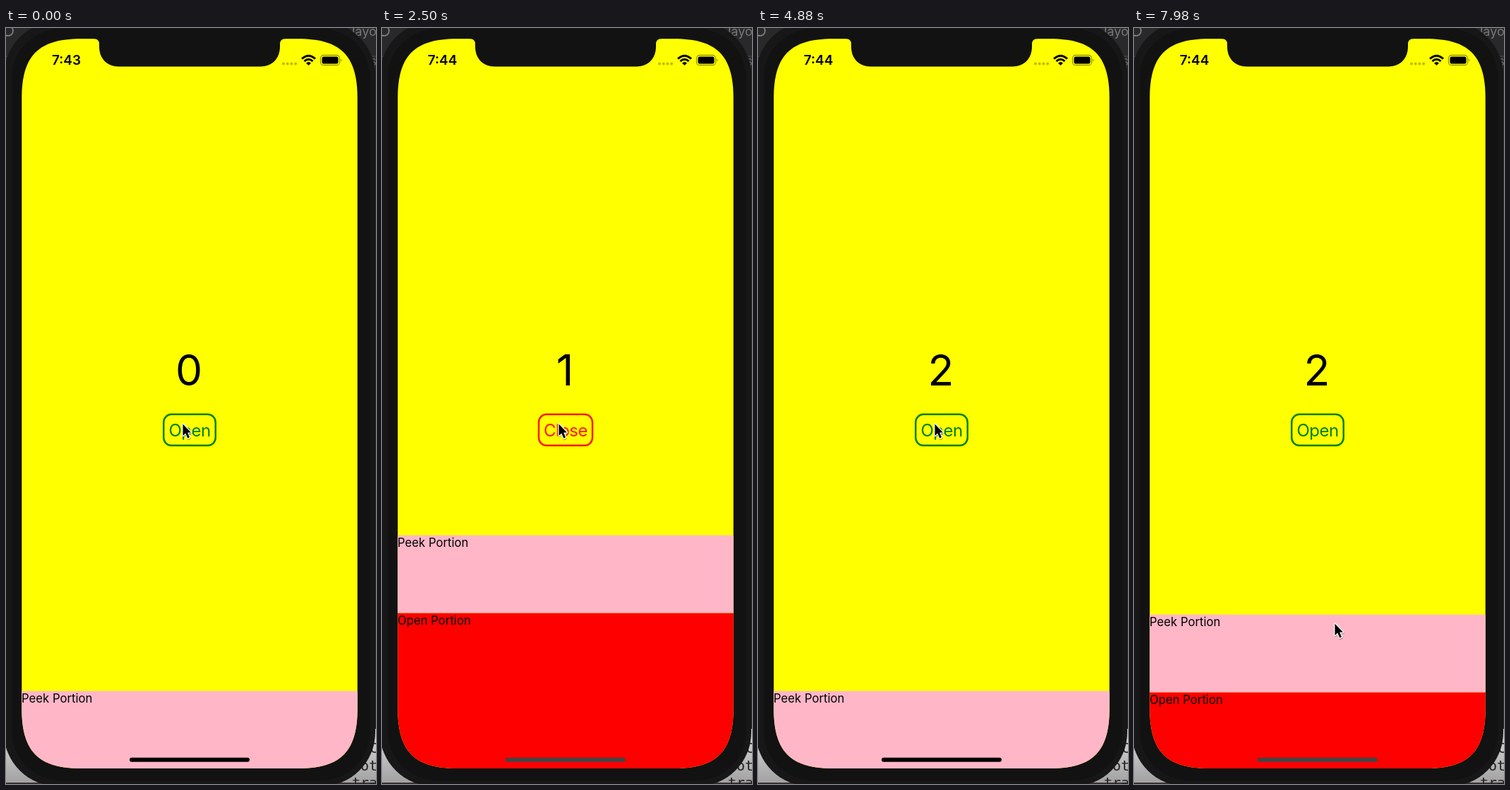
An HTML page that plays this animation: 524x1068 px, repeating every 8 s.

```html
<!DOCTYPE html>
<html lang="en">
<head>
<meta charset="utf-8">
<title>Bottom sheet</title>
<style>
html, body { margin: 0; width: 100%; height: 100%; overflow: hidden; background: #222; }
svg { display: block; width: 524px; height: 1068px; font-family: Inter, Roboto, sans-serif; }
.mid { text-anchor: middle; }
.code { font-family: "DejaVu Sans Mono", "Noto Sans Mono", monospace; font-size: 20px; fill: #222; }
</style>
</head>
<body>
<svg viewBox="0 0 524 1068">
  <defs>
    <clipPath id="screen">
      <path d="M22.300 99C22.300 39 46 15.300 106 15.300H414C474 15.300 497.700 39 497.700 99V962C497.700 1022 474 1046 414 1046H106C46 1046 22.300 1022 22.300 962Z"/>
    </clipPath>
    <linearGradient id="desk" x2="0" y2="1">
      <stop offset="0" stop-color="#ddd"/>
      <stop offset="1" stop-color="#a0a0a0"/>
    </linearGradient>
  </defs>

  <!-- desktop behind the phone -->
  <rect width="524" height="1068" fill="#29292b"/>
  <path d="M0 40H524" stroke="#3b3b3d" stroke-width="2"/>
  <circle cx="3" cy="4" r="7" fill="none" stroke="#777" stroke-width="2"/>
  <rect y="990" width="524" height="78" fill="url(#desk)"/>
  <path d="M0 1067H524" stroke="#3a3030" stroke-width="2"/>

  <text x="490" y="11" font-size="18" fill="#777">layout</text>
  <text x="516" y="53" font-size="17" fill="#666">s</text>
  <text x="515" y="1024" class="code">C</text>
  <text x="502" y="1049" class="code">ot</text>
  <text x="490" y="1073" class="code">tra</text>
  <rect x="-3" y="-9" width="526" height="1080" rx="76" fill="#171717"/>
  <rect x="8" y="1" width="508" height="1062" rx="70" fill="#121212"/>

  <g clip-path="url(#screen)">
    <rect width="524" height="1068" fill="#ff0"/>
    <text id="count" x="259" y="505" class="mid" font-size="60.500"></text>
    <g id="button">
      <rect id="frame" y="545.800" height="44" rx="11" fill="none" stroke="currentColor" stroke-width="2.500"/>
      <text id="label" x="260" y="577" class="mid" font-size="24" letter-spacing="-.5" fill="currentColor"></text>
    </g>
    <g id="sheet" font-size="16.700">
      <rect width="524" height="110" fill="#ffb7c8"/>
      <rect y="110" width="524" height="400" fill="#f00"/>
      <text x="22" y="16.200">Peek Portion</text>
      <text x="22" y="126.200">Open Portion</text>
    </g>
    <rect id="home" x="175" y="1030.800" width="170" height="6" rx="3"/>
  </g>
  <path d="M124 14V15Q132 15 132 23V26C132 43 143 54.500 160 54.500H360C377 54.500 388 43 388 26V23Q388 15 396 15V14Z" fill="#121212"/>

  <!-- status bar -->
  <text id="clock" x="85.500" y="52" class="mid" font-size="19" font-weight="600"></text>
  <path d="M393 50.500H411" stroke="#bcbc00" stroke-width="4" stroke-linecap="round" stroke-dasharray="0 5.700"/>
  <g fill="none" stroke="#000" stroke-width="3">
    <path d="M419 43.500Q428.500 35 438 43.500M422.500 47Q428.500 41.500 434.500 47"/>
    <path d="M425 49.500Q428.500 46.500 432 49.500L428.500 53Z" fill="#000" stroke="none"/>
  </g>
  <rect x="445.500" y="38.500" width="27" height="14" rx="4" fill="none" stroke="#999900" stroke-width="1.300"/>
  <rect x="447.500" y="40.500" width="23" height="10" rx="2.200"/>
  <path d="M474 43.500Q477 45.500 474 47.500Z" fill="#999900"/>

  <g id="cursor" stroke-linejoin="round">
    <path d="M2 4V20L5.500 17L8.500 24L11.500 23L8.700 16H13.500Z" fill="#0003" stroke="#0003" stroke-width="3"/>
    <path d="M1.500 2.500V19L5.300 15.500L8.300 22.500L11 21.300L8.200 14.500H13Z" stroke="#fff" stroke-width="2.600" paint-order="stroke"/>
  </g>
</svg>
<script>
const LOOP = 8000, CLOSED = 936.6, TRAVEL = 220;
const OPENING = [1900, 2400], CLOSING = [4187, 4687];
const MOVE = [5250, 6250], DRAG = [7350, 7980];
const part = Object.fromEntries(
  [...document.querySelectorAll("svg [id]")].map(el => [el.id, el]));

const progress = (t, [from, to]) => Math.min(1, Math.max(0, (t - from) / (to - from)));
const ease = u => u * u * (3 - 2 * u);
const during = (t, [from, to]) => t >= from && t < to;
const place = (el, x, y) => el.setAttribute("transform", `translate(${x} ${y})`);

function draw(t) {
  const move = ease(progress(t, MOVE));
  const drag = progress(t, DRAG) ** 1.4;
  const dragged = Math.max(0, 129 * drag - 21);
  const lift = TRAVEL * (ease(progress(t, OPENING)) - ease(progress(t, CLOSING))) + dragged;
  place(part.sheet, 0, CLOSED - lift);
  place(part.cursor, 249 + 16 * move + 18 * drag, 557 + 411 * move - 129 * drag);

  // The count and label change only once the sheet has settled.
  const open = during(t, [OPENING[1], CLOSING[1]]);
  const moving = during(t, OPENING) || during(t, CLOSING);
  const width = open ? 76 : 73.5;
  part.button.style.color = moving ? "#ffa500" : open ? "#ff1a00" : "#008000";
  part.frame.setAttribute("x", 260 - width / 2);
  part.frame.setAttribute("width", width);
  part.label.textContent = open ? "Close" : "Open";
  part.count.textContent = (t >= OPENING[1]) + (t >= CLOSING[1]);
  part.clock.textContent = t < 2100 ? "7:43" : "7:44";

  const shade = Math.round(68 * progress(lift, [10, 50]));
  part.home.setAttribute("fill", `rgb(${shade} ${shade} ${shade})`);
}

function tick() {
  draw(performance.now() % LOOP);
  requestAnimationFrame(tick);
}
tick();
</script>
</body>
</html>
```
